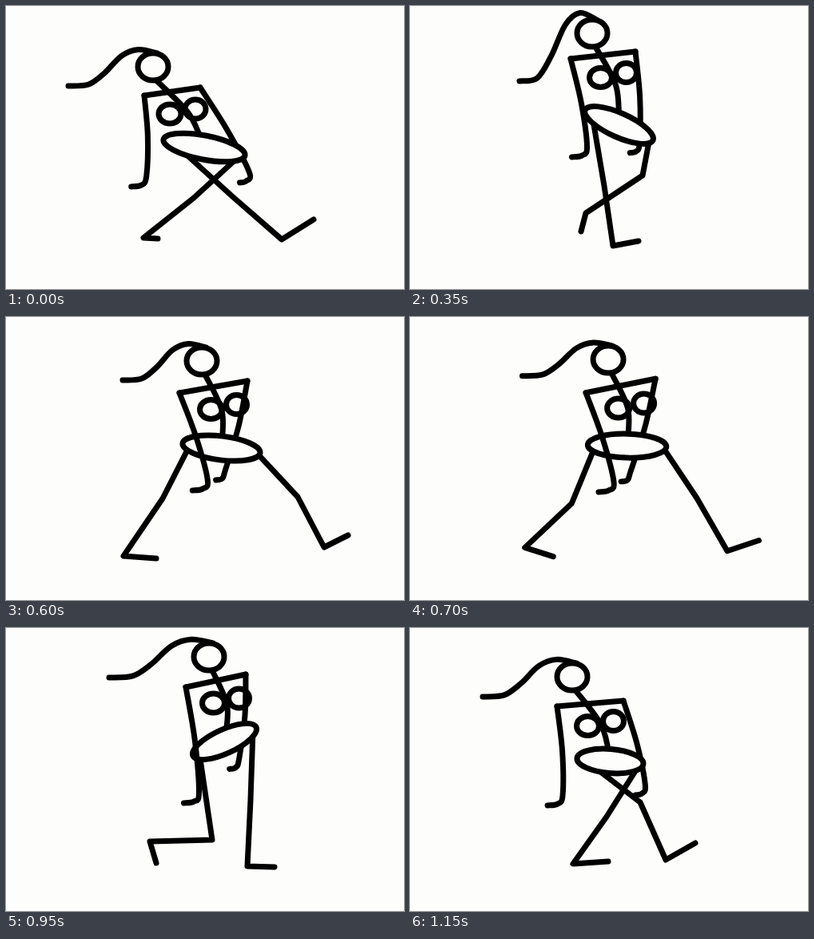
An HTML page with a canvas for the animation above (1200 ms loop, 498 by 354 pixels).

```html
<!DOCTYPE html>
<html>
<head>
<meta charset="utf-8">
<style>
html, body { margin: 0; height: 100%; overflow: hidden; background: #fdfefc; }
canvas { display: block; }
</style>
</head>
<body>
<canvas id="stage" width="498" height="354"></canvas>
<script>
const LOOP = 1200, STEP = 50, PAPER = '#fdfefc';
const ctx = document.getElementById('stage').getContext('2d');

// Main joints at the key times of the walk; everything else follows from them.
const TIMES = [0, 200, 350, 600, 800, 950, 1150];
const joints = {
  hairTip:   [[78, 100], [110, 101], [137, 94], [146, 79], [133, 69], [129, 62], [91, 86]],
  head:      [[184, 76], [202, 56], [228, 34], [245, 55], [250, 47], [254, 36], [203, 61]],
  shoulderL: [[173, 112], [187, 95], [201, 66], [217, 95], [222, 89], [225, 74], [184, 98]],
  shoulderR: [[243, 102], [258, 69], [282, 57], [302, 80], [309, 70], [300, 58], [267, 91]],
  hipL:      [[197, 167], [206, 151], [219, 130], [221, 158], [225, 159], [234, 160], [209, 163]],
  hipR:      [[299, 187], [296, 180], [304, 168], [318, 170], [321, 150], [313, 124], [292, 170]],
  kneeL:     [[283, 238], [255, 225], [243, 225], [196, 227], [220, 243], [258, 265], [288, 218]],
  ankleL:    [[345, 292], [307, 293], [254, 300], [147, 299], [156, 276], [180, 267], [320, 290]],
  toeL:      [[385, 267], [359, 293], [286, 294], [188, 302], [182, 296], [188, 294], [357, 269]],
  kneeR:     [[235, 240], [268, 227], [291, 212], [365, 225], [339, 225], [306, 215], [246, 236]],
  ankleR:    [[172, 290], [192, 263], [220, 259], [398, 288], [366, 295], [302, 298], [204, 295]],
  toeR:      [[190, 291], [205, 294], [214, 282], [428, 273], [410, 289], [336, 299], [248, 292]]
};

const shift = ([x, y], dx, dy) => [x + dx, y + dy];
const mix = (a, b, u, v = u) => [a[0] + (b[0] - a[0]) * u, a[1] + (b[1] - a[1]) * v];

// Cyclic cubic interpolation between key points.
function place(track, t) {
  const n = TIMES.length;
  const key = i => track[(i + n) % n];
  const time = i => TIMES[(i + n) % n] + LOOP * Math.floor(i / n);
  const i = TIMES.findLastIndex(k => k <= t);
  const span = time(i + 1) - time(i), u = (t - time(i)) / span;
  const slope = (j, c) => span * (key(j + 1)[c] - key(j - 1)[c]) / (time(j + 1) - time(j - 1));
  return [0, 1].map(c => {
    const a = key(i)[c], b = key(i + 1)[c], ma = slope(i, c), mb = slope(i + 1, c);
    return a + u * (ma + u * (3 * (b - a) - 2 * ma - mb + u * (2 * (a - b) + ma + mb)));
  });
}

function line(...points) {
  ctx.beginPath();
  points.forEach(p => ctx.lineTo(...p));
  ctx.stroke();
}

// Smooth line through all points.
function curve(...points) {
  const at = i => points[Math.max(0, Math.min(points.length - 1, i))];
  ctx.beginPath();
  ctx.moveTo(...points[0]);
  for (let i = 0; i < points.length - 1; i++) {
    const p = at(i - 1), a = at(i), b = at(i + 1), q = at(i + 2);
    ctx.bezierCurveTo(a[0] + (b[0] - p[0]) / 6, a[1] + (b[1] - p[1]) / 6,
      b[0] - (q[0] - a[0]) / 6, b[1] - (q[1] - a[1]) / 6, ...b);
  }
  ctx.stroke();
}

function oval([x, y], rx, ry, turn = 0) {
  ctx.beginPath();
  ctx.ellipse(x, y, rx, ry, turn, 0, 2 * Math.PI);
}

function ring(center, rx, ry) {
  oval(center, rx, ry);
  ctx.stroke();
}

function pelvis(a, b) {
  const dx = b[0] - a[0], dy = b[1] - a[1];
  oval(mix(a, b, 0.5), Math.hypot(dx, dy) / 2, 15, Math.atan2(dy, dx));
  ctx.fill();
  ctx.stroke();
}

function arm(shoulder, wrist, reach) {
  curve(shoulder, shift(mix(shoulder, wrist, 0.5), 3, 0), wrist,
    shift(wrist, -reach / 3, 11), shift(wrist, -reach, 13));
}

function hair(tip, end) {
  curve(tip, mix(tip, end, 0.23, 0.05), mix(tip, end, 0.41, 0.4),
    mix(tip, end, 0.6, 0.92), mix(tip, end, 0.79, 1.11), end);
}

function draw(now) {
  const t = Math.floor(now % LOOP / STEP) * STEP;
  const j = {};
  for (const name in joints) j[name] = place(joints[name], t);

  const phase = 2 * Math.PI * t / LOOP, swing = Math.cos(phase - 0.35);
  const wristL = shift(j.hipL, 5 - 28 * swing, 46);
  const wristR = shift(j.hipR, -19 + 26 * swing, 21 - 19 * Math.sin(phase));
  const chest = mix(j.shoulderL, j.shoulderR, 0.5);
  const neck = shift(j.head, 4, 17), waist = mix(j.hipL, j.hipR, 0.5);

  ctx.fillStyle = PAPER;
  ctx.fillRect(0, 0, 498, 354);
  ctx.strokeStyle = '#000';
  ctx.lineWidth = 7;
  ctx.lineCap = ctx.lineJoin = 'round';

  arm(j.shoulderR, wristR, 12);
  line(mix(j.hipL, j.hipR, 0.95), j.kneeR, j.ankleR, j.toeR);
  line(mix(j.hipL, j.hipR, 0.1), j.kneeL, j.ankleL, j.toeL);
  curve(neck, shift(mix(neck, waist, 0.5), 11, 0), waist);
  pelvis(j.hipL, j.hipR);
  line(j.shoulderL, j.shoulderR);
  arm(j.shoulderL, wristL, 19);
  ring(shift(chest, -3, 28), 14, 12);
  ring(shift(chest, 29, 22), 13, 12);
  ring(j.head, 19, 17);
  hair(j.hairTip, shift(j.head, 5, -17));
}

const start = performance.now();
function tick() {
  draw(performance.now() - start);
  requestAnimationFrame(tick);
}
tick();
</script>
</body>
</html>
```
